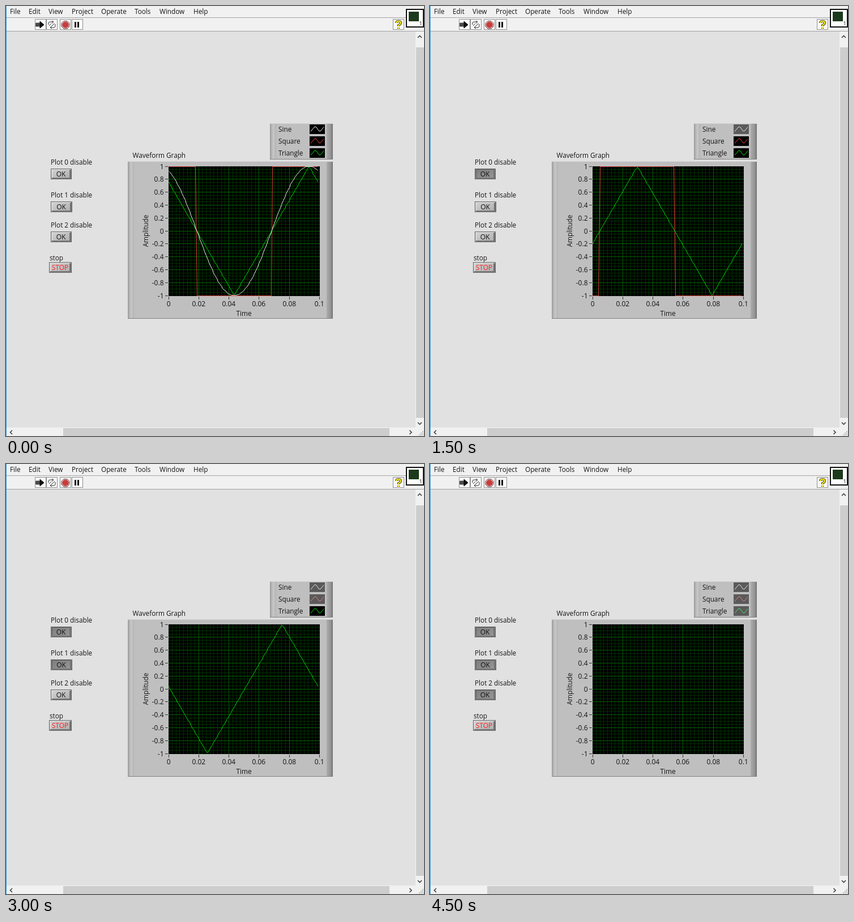
Write an HTML page that moves like this. It is 738 by 759 pixels and loops after 5000 ms.

```html
<!DOCTYPE html>
<html lang="en">
<head>
<meta charset="utf-8">
<title>Waveform Graph</title>
<style>
  html, body { margin: 0; width: 100%; height: 100%; overflow: hidden; background: #e1e1e1; }
  svg { display: block; }
  text { font: 11.75px "Open Sans", "Noto Sans", sans-serif; fill: #141414; }
  text.tick, text.face { font-size: 12px; }
  rect, .crisp { shape-rendering: crispEdges; }
  .wave { fill: none; stroke-width: 1; stroke-linejoin: round; }
</style>
</head>
<body>
<svg id="stage" width="738" height="759" viewBox="0 0 738 759">
  <defs>
    <linearGradient id="leftEdge">
      <stop offset="0" stop-color="#989898"/><stop offset=".2" stop-color="#b0b0b0"/>
      <stop offset=".5" stop-color="#c8c8c8"/><stop offset=".85" stop-color="#b6b6b6"/>
      <stop offset="1" stop-color="#bfbfbf"/>
    </linearGradient>
    <linearGradient id="rightEdge">
      <stop offset="0" stop-color="#bfbfbf"/><stop offset=".2" stop-color="#a6a6a6"/>
      <stop offset=".7" stop-color="#949494"/><stop offset="1" stop-color="#707070"/>
    </linearGradient>
    <linearGradient id="raised" x2="1" y2="1">
      <stop offset="0" stop-color="#d4d4d4"/><stop offset="1" stop-color="#acacac"/>
    </linearGradient>
    <linearGradient id="pressed" x2="1" y2="1">
      <stop offset="0" stop-color="#7c7c7c"/><stop offset="1" stop-color="#999"/>
    </linearGradient>
  </defs>
</svg>
<script>
const stage = document.getElementById('stage');

function add(tag, attrs, content) {
  const node = document.createElementNS(stage.namespaceURI, tag);
  for (const key in attrs) node.setAttribute(key, attrs[key]);
  if (content !== undefined) node.textContent = content;
  return stage.appendChild(node);
}
const box = (x, y, width, height, fill, more) => add('rect', { x, y, width, height, fill, ...more });
const label = (x, y, content, more) => add('text', { x, y, ...more }, content);
const path = (d, stroke, more) => add('path', { d, stroke, fill: 'none', ...more });

// Window, menu and toolbar
box(0, 0, 738, 45, '#f1f1f1');
box(0, 20, 706, 1, '#a6a6a6');
box(0, 44, 738, 1, '#a0a0a0');
[['File', 7], ['Edit', 40], ['View', 75], ['Project', 116], ['Operate', 168],
 ['Tools', 227], ['Window', 271], ['Help', 331]].forEach(([name, x]) => label(x, 13.5, name));

const toolBox = x => box(x + .5, 23.5, 19, 18, '#fafafa', { stroke: '#8f8f8f' });
[51, 71, 95, 116, 683].forEach(toolBox);
path('M53 30H60V27L67 33L60 39V36H53Z', '#111', { fill: '#111' });
path('M55 29V37M58 29V37', '#fafafa', { 'stroke-width': .7 });
path('M75 33V30Q75 28 78 28H83M81 26L84 28L81 31M87 32V36Q87 38 84 38H79M81 35L78 38L81 40' +
     'M76 35L80 31M81 35L86 31', '#333', { 'stroke-width': 1 });
path('M102 26.5H108L112 30.5V36L108 40H102L98 36V30.5Z', '#6a3a3a', { fill: '#e8c4c4' });
path('M102.7 28.5H107.3L110 31.2V35.3L107.3 38H102.7L100 35.3V31.2Z', '#c03c3c', { fill: '#c83c3c' });
box(121, 28, 3, 10, '#111');
box(126, 28, 3, 10, '#111');
const question = 'M689 30Q689 27 693 27Q697 27 697 30Q697 32 693 34V36M693 38V40';
path(question, '#222', { 'stroke-width': 4 });
path(question, '#f4e61c', { 'stroke-width': 2.3 });
box(707, 6, 30, 31, '#fff', { stroke: '#111', 'stroke-width': 2 });
box(711, 10, 18, 17, '#1c3a1c');
label(729.5, 34, '1', { style: 'font-size:9px' });

// Scroll bars
box(723, 45, 15, 714, '#f1f1f1');
box(1, 744, 737, 15, '#f1f1f1');
box(724, 73, 14, 654, '#cdcdcd');
box(101, 745, 576, 14, '#cdcdcd');
path('M727 56L730.5 52.5L734 56M727 735L730.5 738.5L734 735' +
     'M11 749L7.5 752.5L11 756M712.5 749L716 752.5L712.5 756', '#454545', { 'stroke-width': 1.7 });
for (let row = 0; row < 3; row++)
  for (let col = 0; col <= row; col++) box(735 - col * 3, 750 + row * 3, 2, 2, '#b8b8b8');
box(0, 0, 1, 759, '#3b97d8');

// Buttons
function button(x, y, width, height, content, fill) {
  const face = box(x + .5, y + .5, width - 1, height - 1, 'url(#raised)', { stroke: '#666' });
  const shine = path(`M${x + 2} ${y + height - 2}V${y + 1.5}H${x + width - 3}`, '#e0e0e0', { class: 'crisp' });
  path(`M${x + width - 2.5} ${y + 2}V${y + height - 1.5}H${x + 2}`, '#747474',
    { class: 'crisp', 'stroke-width': 3 });
  label(x + width / 2 - .5, y + height / 2 + 4.5, content,
    { class: 'face', 'text-anchor': 'middle', style: `fill:${fill}` });
  return pressed => {
    face.setAttribute('fill', pressed ? 'url(#pressed)' : 'url(#raised)');
    shine.setAttribute('stroke', pressed ? '#606060' : '#e0e0e0');
  };
}
const setButton = [[79, 287, 37], [79, 345, 38], [79, 398, 37]].map(([x, y, width], i) => {
  label(x, y - 7, `Plot ${i} disable`);
  return button(x, y, width, 19, 'OK', '#141414');
});
label(77, 449, 'stop');
button(76, 452, 40, 19, 'STOP', '#ff2020');

// Panels
function panel(x, y, width, height) {
  box(x, y, width, height, '#bfbfbf');
  box(x, y, 12, height, 'url(#leftEdge)');
  box(x + width - 12, y, 12, height, 'url(#rightEdge)');
  box(x, y, width, 1, '#d2d2d2');
  box(x, y + height - 1, width, 1, '#828282');
}
panel(466, 207, 111, 64);
panel(215, 274, 362, 278);
label(223.5, 268, 'Waveform Graph');

// Graph, snapped to whole pixels
const plot = { x: 287, y: 283, width: 266.5, height: 228 };
const px = t => Math.floor(plot.x + plot.width * t / 0.1);
const py = v => Math.floor(plot.y + plot.height * (1 - v) / 2);
box(plot.x, plot.y, 267, 229, '#000');

function grid(columns, rows, stroke) {
  let d = '';
  for (let i = 1; i < columns; i++) d += `M${px(i * .1 / columns) + .5} ${plot.y}v229`;
  for (let i = 1; i < rows; i++) d += `M${plot.x} ${py(1 - 2 * i / rows) + .5}h267`;
  path(d, stroke, { class: 'crisp' });
}
grid(40, 40, '#003000');
grid(5, 10, '#006200');

for (let i = 0; i <= 10; i++) {
  const value = (10 - 2 * i) / 10;
  label(278.5, py(value) + 4.7, value, { class: 'tick', 'text-anchor': 'end' });
  box(281, py(value), 5, 1, '#333');
}
for (let i = 0; i <= 5; i++) {
  const time = i * 2 / 100;
  label(px(time) + .3, 530, time, { class: 'tick', 'text-anchor': 'middle' });
  box(px(time), 513, 1, 5, '#333');
}
label(420, 546.5, 'Time', { 'text-anchor': 'middle' });
label(0, 0, 'Amplitude', { 'text-anchor': 'middle', transform: 'translate(250.5 397) rotate(-90)' });

// Signals take a phase in cycles
const fraction = p => p - Math.floor(p);
const signals = [
  { name: 'Sine', color: '#f0f0f0', faded: '#dcdcdc', offAt: 3, value: p => Math.sin(2 * Math.PI * p) },
  { name: 'Square', color: '#e24438', faded: '#d88080', offAt: 6, value: p => fraction(p) < .5 ? 1 : -1 },
  { name: 'Triangle', color: '#00e000', faded: '#50dc60', offAt: 9,
    value: p => 1 - 4 * Math.abs(fraction(p + .25) - .5) }
];
signals.forEach((signal, i) => {
  const y = 209 + 21 * i;
  label(481, y + 13, signal.name);
  signal.swatch = box(536, y, 27, 17, '#000');
  signal.icon = path(`M538 ${y + 12.5}L544 ${y + 5}Q546 ${y + 3} 548 ${y + 5}L552 ${y + 11}` +
    `Q554 ${y + 13} 556 ${y + 11}L561 ${y + 4.5}`, signal.color, { class: 'wave' });
});
[1, 2, 0].forEach(i => { signals[i].curve = path('', signals[i].color, { class: 'wave' }); });

// Each iteration reads 100 samples of a 10.1 Hz signal, so the phase drifts by 1% of a cycle
const iterations = [31, 49, 66, 95, 108, 120, 149, 162, 174, 190];
const stepMs = 500;

function trace(value, iteration) {
  let d = '';
  for (let i = 0; i < 100; i++) {
    const level = value(i * .0101 + iteration * .01);
    d += `${i ? 'L' : 'M'}${px(i / 1000) + .5} ${py(level) + .5}`;
  }
  return d;
}

let shown = -1;
function show(step) {
  if (step === shown) return;
  shown = step;
  signals.forEach((signal, i) => {
    const off = step >= signal.offAt;
    setButton[i](off);
    signal.swatch.setAttribute('fill', off ? '#5a5a5a' : '#000');
    signal.icon.setAttribute('stroke', off ? signal.faded : signal.color);
    signal.curve.setAttribute('d', off ? '' : trace(signal.value, iterations[step]));
  });
}

const start = performance.now();
function tick() {
  show(Math.floor((performance.now() - start) / stepMs) % iterations.length);
  requestAnimationFrame(tick);
}
tick();
</script>
</body>
</html>
```
